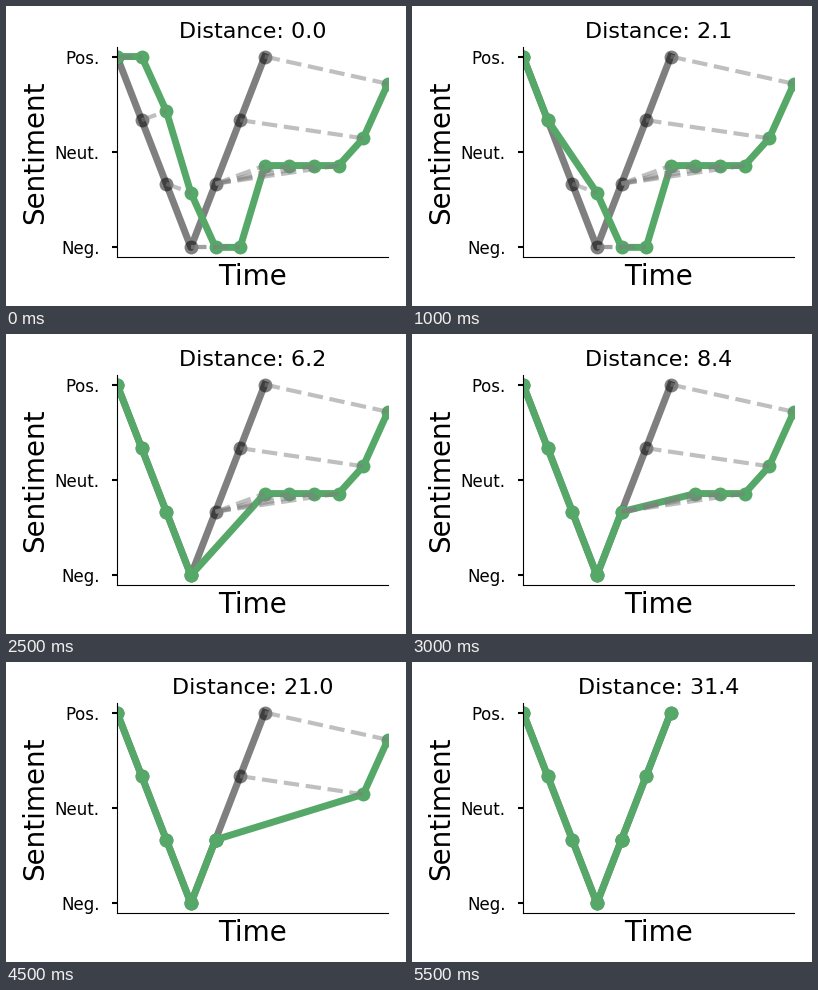
Write a matplotlib script that moves like this. It is 400 by 300 pixels and loops after 7.5 s.

```python
import matplotlib.pyplot as plt
import numpy as np
from matplotlib.animation import FuncAnimation

W, H, DPI = 400, 300, 100
LEFT, RIGHT, TOP, BOTTOM = 111.05, 381.8, 41, 250.9
GREEN = "#55a868"

plt.rcParams["font.family"] = "DejaVu Sans"
plt.rcParams["font.size"] = 12
plt.rcParams["text.kerning_factor"] = 6

# Template shape and the series that is warped onto it
ref = np.abs(np.arange(7) - 3) * 2 / 3 - 1
series = np.array([7, 7, 5, 2, 0, 0, 3, 3, 3, 3, 4, 6]) * 2 / 7 - 1


def warp_path(a, b):
    """Template index matched to each point, by dynamic time warping."""
    cost = np.full((len(a) + 1, len(b) + 1), np.inf)
    cost[0, 0] = 0
    for i in range(1, len(a) + 1):
        for j in range(1, len(b) + 1):
            best = min(cost[i - 1, j - 1], cost[i, j - 1], cost[i - 1, j])
            cost[i, j] = abs(a[i - 1] - b[j - 1]) + best
    i, j = len(a), len(b)
    pairs = [(i - 1, j - 1)]
    while (i, j) != (1, 1):
        steps = [(i - 1, j - 1), (i, j - 1), (i - 1, j)]
        i, j = min(steps, key=lambda s: cost[s])
        pairs.append((i - 1, j - 1))
    return pairs[::-1]


pairs = warp_path(ref, series)
xs = np.arange(len(series), dtype=float)
moves = [abs(i - j) + abs(ref[i] - series[j]) for i, j in pairs]
distance = np.cumsum(moves)

fig = plt.figure(figsize=(W / DPI, H / DPI), dpi=DPI, facecolor="white")
ax = fig.add_axes([LEFT / W, 1 - BOTTOM / H, (RIGHT - LEFT) / W, (BOTTOM - TOP) / H])
ax.set_xlim(0, len(series) - 1)
ax.set_ylim(-1.1, 1.1)
ax.spines[["top", "right"]].set_visible(False)
ax.set_xticks([])
ax.set_yticks([-1, 0, 1], ["Neg.", "Neut.", "Pos."])
ax.tick_params(axis="y", length=3.5, width=1.5, pad=9, labelsize=12)

mid_x = (LEFT + RIGHT) / 2 / W
mid_y = 1 - (TOP + BOTTOM) / 2 / H
fig.text(mid_x, 1 - 279 / H, "Time", size=20, ha="center", va="baseline")
fig.text(37.3 / W, mid_y, "Sentiment", size=20, rotation=90,
         rotation_mode="anchor", ha="center", va="baseline")
title = ax.set_title("", fontsize=16, pad=6.4)

style = dict(marker="o", lw=5, ms=10, mew=0)
ax.plot(ref, color="black", alpha=0.5, **style)
curve, = ax.plot(xs, series, color=GREEN, **style)
links = [ax.plot([], [], "--", color="gray", alpha=0.5, lw=3)[0] for _ in pairs]


def draw(frame):
    step = min(frame, len(pairs) - 1)
    x, y = xs.copy(), series.copy()
    for i, j in pairs[:step + 1]:
        x[j], y[j] = i, ref[i]
    curve.set_data(x, y)
    for n, (link, (i, j)) in enumerate(zip(links, pairs)):
        link.set_data([i, x[j]], [ref[i], y[j]])
        link.set_visible(n > step)
    title.set_text(f"Distance: {distance[step]:.1f}")
    return [curve, title, *links]


anim = FuncAnimation(fig, draw, frames=15, interval=500, repeat=True,
                     repeat_delay=0, blit=False)
plt.show()
```
